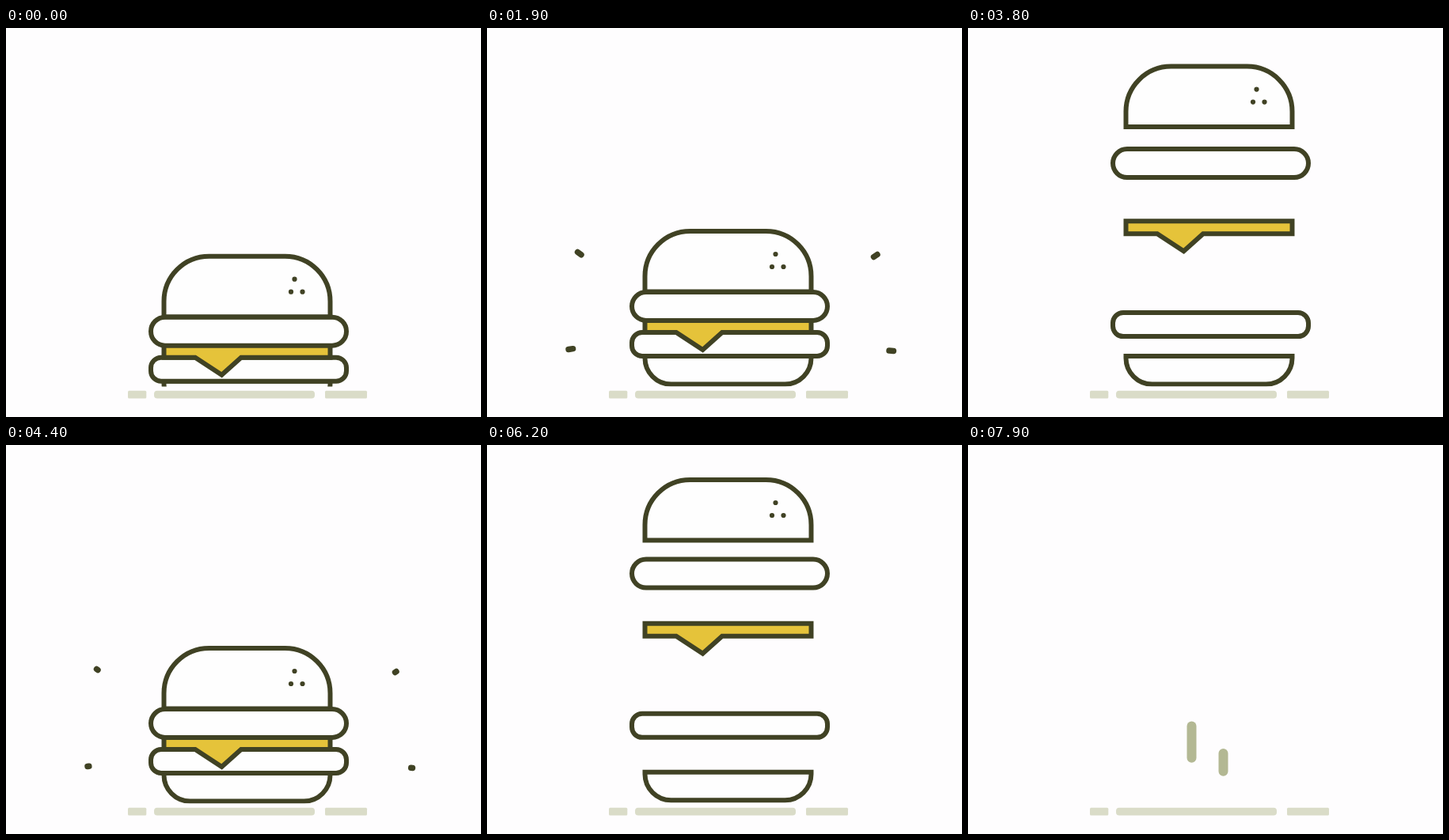
These frames come from a looping animation (600x492 px, 8 s). An HTML page with a canvas:

```html
<!DOCTYPE html>
<html lang="en">
<head>
<meta charset="utf-8">
<title>Burger</title>
<style>
html, body { margin: 0; width: 100%; height: 100%; overflow: hidden; background: #fefdfe; }
canvas { display: block; }
</style>
</head>
<body>
<canvas id="stage" width="600" height="492"></canvas>
<script>
const ctx = document.getElementById('stage').getContext('2d');
const DARK = '#404224', CHEESE = '#e5c33a', WHITE = '#fefefe', GROUND = '#dadcc8', TRAIL = '#b3b893';
const LOOP = 8000, CYCLE = 2420, STAGGER = 81, HOVER = 234, SINK_LEAD = 90, FLOOR = 453.5;

const clamp = v => Math.max(0, Math.min(1, v));
const span = (t, start, length) => clamp((t - start) / length);
const smooth = u => u * u * (3 - 2 * u);
const easeOut = u => 1 - (1 - u) ** 3;

// Cubic bezier easing (.96, 0, .662, 1), solved by bisection.
function fallEase(x) {
  let low = 0, high = 1;
  for (let i = 0; i < 20; i++) {
    const s = (low + high) / 2, r = 1 - s;
    if (3 * r * r * s * 0.96 + 3 * r * s * s * 0.662 + s ** 3 < x) low = s;
    else high = s;
  }
  return smooth(low);
}

function shape(path, fill = WHITE) {
  ctx.fillStyle = fill;
  ctx.fill(path);
  ctx.strokeStyle = DARK;
  ctx.lineWidth = 6;
  ctx.stroke(path);
}

function box(x, y, w, h, radii) {
  const path = new Path2D();
  path.roundRect(x, y, w, h, radii);
  return path;
}

const bottomBun = box(199.5, 415, 210, 35.5, [0, 0, 33, 33]);
const lowerPatty = box(183, 385, 247, 30, 13);
const upperPatty = box(183, 334, 247, 36, 18);
const topBun = box(199.5, 257, 210, 76.5, [57, 57, 0, 0]);
const cheese = new Path2D('M199.5 369H409.5V385H297L272.5 407L239 385H199.5Z');

// Layers from the bottom up, with the centre each one grows from.
const layers = [
  { cx: 304.5, cy: 432.5, draw: () => shape(bottomBun) },
  { cx: 306.5, cy: 400, draw: () => shape(lowerPatty) },
  { cx: 304.5, cy: 388, draw: () => shape(cheese, CHEESE) },
  { cx: 306.5, cy: 352, draw: () => shape(upperPatty) },
  { cx: 304.5, cy: 295, draw: drawTopBun }
];

function drawTopBun() {
  shape(topBun);
  ctx.fillStyle = DARK;
  for (const [x, y] of [[364.5, 286], [360, 302], [374.5, 302]]) {
    ctx.beginPath();
    ctx.arc(x, y, 3.1, 0, 7);
    ctx.fill();
  }
}

function drawBurger(p) {
  const sinkTime = (p + SINK_LEAD) % CYCLE;
  const sinking = sinkTime < 600;
  const sink = sinking ? 31 * (sinkTime / SINK_LEAD) ** 2 : 0;
  if (sink > 205) return;
  layers.forEach((layer, i) => {
    const time = sinking ? CYCLE : p - i * STAGGER;
    const scale = span(time, 657, 310);
    if (!scale) return;
    const dy = sink - HOVER * (1 - fallEase(span(time, 790, 595)));
    ctx.save();
    ctx.translate(layer.cx, layer.cy + dy);
    ctx.scale(scale, scale);
    ctx.translate(-layer.cx, -layer.cy);
    layer.draw();
    ctx.restore();
  });
}

// Part of a line between two fractions of its length.
function trimmed(x1, y1, x2, y2, tail, head, width, color) {
  if (head <= 0 || tail > 0.985) return;
  ctx.strokeStyle = color;
  ctx.lineWidth = width;
  ctx.lineCap = 'round';
  ctx.beginPath();
  ctx.moveTo(x1 + (x2 - x1) * tail, y1 + (y2 - y1) * tail);
  ctx.lineTo(x1 + (x2 - x1) * head, y1 + (y2 - y1) * head);
  ctx.stroke();
  ctx.lineCap = 'butt';
}

function drawTrails(p) {
  const trail = (x, from, to, start, headTime, lag, tailTime) => trimmed(x, from, x, to,
    smooth(span(p, start + lag, tailTime)), smooth(span(p, start, headTime)), 12, TRAIL);
  trail(322.5, 275, 445, 179, 140, 55, 130);
  trail(282.5, 275, 445, 254, 140, 55, 130);
  trail(282.5, 414, 275, 565, 170, 35, 180);
  trail(322.5, 414, 275, 596, 170, 35, 180);
}

function drawSparks(p) {
  const head = easeOut(span(p, 1510, 400)), tail = easeOut(span(p, 1600, 560));
  const sparks = [
    [160, 316, 114.5, 283.5], [448, 317, 493, 286.5],
    [159, 398, 103, 406.5], [458, 404, 513.5, 408.5]
  ];
  for (const s of sparks) trimmed(...s, tail, head, 7.5, DARK);
}

function drawGround() {
  ctx.fillStyle = GROUND;
  ctx.fill(box(154, 458.8, 23.3, 9.6, 1.5));
  ctx.fill(box(187, 458.8, 203, 9.6, 4));
  ctx.fill(box(403, 458.8, 53, 9.6, 1.5));
}

function frame() {
  const p = performance.now() % LOOP % CYCLE;
  ctx.fillStyle = '#fefdfe';
  ctx.fillRect(0, 0, 600, 492);
  drawGround();
  ctx.save();
  ctx.beginPath();
  ctx.rect(0, 0, 600, FLOOR);
  ctx.clip();
  drawTrails(p);
  drawBurger(p);
  drawSparks(p);
  ctx.restore();
  requestAnimationFrame(frame);
}
frame();
</script>
</body>
</html>
```
